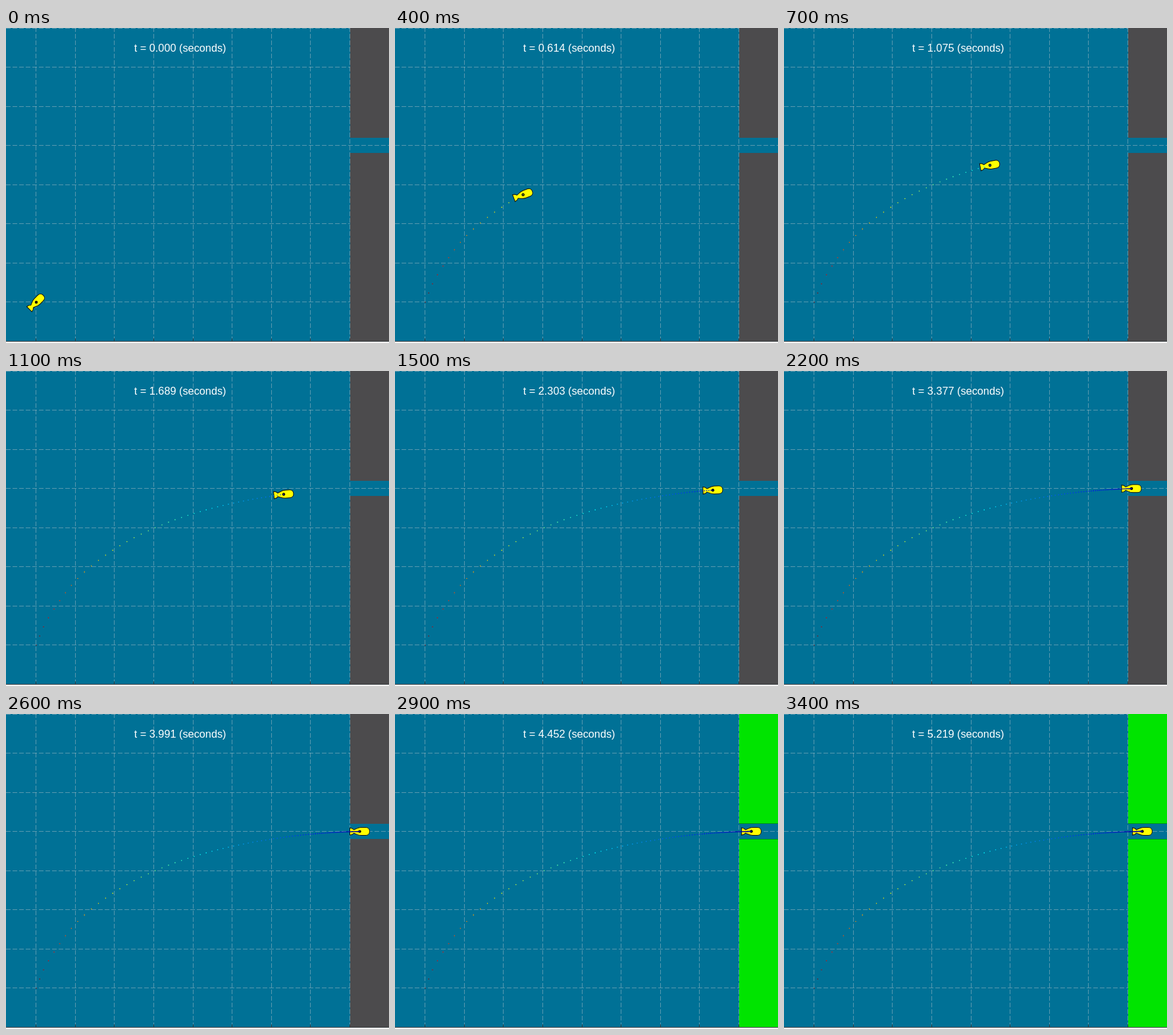
Write an HTML page with a canvas that moves like this. It is 582 px wide and 479 px high and loops after 3.5 s.

```html
<!DOCTYPE html>
<html lang="en">
<head>
<meta charset="utf-8">
<title>Fish trajectory</title>
<style>
  html, body { margin: 0; width: 582px; height: 479px; overflow: hidden; background: #f0f0f0; }
  canvas { display: block; }
</style>
</head>
<body>
<canvas id="stage" width="582" height="479"></canvas>
<script>
const ctx = document.getElementById('stage').getContext('2d');
const LOOP = 3500, FRAME = 100, SUBSTEPS = 4;
const GRID = 59.56, LEFT = 46, BOTTOM = 476, WALL = 523;
const GATE = { top: 167, bottom: 190 };
const OPEN_FRAME = 27;

// Horizontal position at selected substeps, joined by a smooth curve.
const KNOTS = [[0, 46], [2, 57], [4, 73], [8, 109], [14, 173], [20, 237], [28, 313],
  [36, 375], [44, 422], [60, 483], [76, 515], [90, 529.7], [104, 537.5], [116, 541.5], [136, 544.5]];

function slope(k) {
  const a = KNOTS[Math.max(k - 1, 0)], b = KNOTS[Math.min(k + 1, KNOTS.length - 1)];
  return (b[1] - a[1]) / (b[0] - a[0]);
}

function xAt(i) {
  let k = 0;
  while (k < KNOTS.length - 2 && i > KNOTS[k + 1][0]) k++;
  const [i0, x0] = KNOTS[k], [i1, x1] = KNOTS[k + 1];
  const h = i1 - i0, u = (i - i0) / h, w = 1 - u;
  return (1 + 2 * u) * w * w * x0 + u * w * w * h * slope(k)
    + u * u * (3 - 2 * u) * x1 - u * u * w * h * slope(k + 1);
}

function yAt(i) {
  return 178.5 + 238.5 * Math.exp(-0.0757 * i + 0.055 * (1 - Math.exp(-i / 3)));
}

const headingAt = i => -Math.PI / 4 * Math.exp(-0.05 * i);

function jet(v) {
  const channel = c => Math.round(255 * Math.min(1, Math.max(0, 1.5 - Math.abs(4 * v - c))));
  return `rgb(${channel(3)},${channel(2)},${channel(1)})`;
}

const trail = Array.from({ length: 137 }, (_, i) => ({
  x: xAt(i), y: yAt(i), color: jet(Math.exp(-0.037 * i))
}));

const fish = new Path2D(`M-15 -5.5 L-11.5 -4.7 L-9 -2.6 C-5.5 -3.6 -3 -6 2 -6 L9 -6
  C13 -6 15 -3 15 0 C15 3 13 6 9 6 L2 6 C-3 6 -5.5 3.6 -9 2.6 L-11.5 4.7 L-15 5.5 Z`);

function line(x0, y0, x1, y1) {
  ctx.beginPath();
  ctx.moveTo(x0, y0);
  ctx.lineTo(x1, y1);
  ctx.stroke();
}

function dot(x, y, r, color) {
  ctx.fillStyle = color;
  ctx.beginPath();
  ctx.arc(x, y, r, 0, 2 * Math.PI);
  ctx.fill();
}

const snap = v => Math.floor(v) + 0.5;
const columnAt = k => snap(LEFT + k * GRID - 0.2);

function drawTank(open) {
  ctx.fillStyle = '#f0f0f0';
  ctx.fillRect(0, 0, 582, 479);
  ctx.fillStyle = '#007196';
  ctx.fillRect(0, 0, 582, BOTTOM);

  ctx.lineWidth = 1;
  ctx.strokeStyle = 'rgba(220,212,212,.4)';
  ctx.setLineDash([7, 3]);
  for (let k = 0; k < 8; k++) {
    const y = snap(k * GRID);
    line(0, y, 582, y);
  }
  for (let k = 0; k < 9; k++) line(columnAt(k), BOTTOM, columnAt(k), 0);
  ctx.setLineDash([]);

  ctx.fillStyle = open ? '#00e400' : '#4c4b4d';
  ctx.fillRect(WALL, 0, 582 - WALL, GATE.top);
  ctx.fillRect(WALL, GATE.bottom, 582 - WALL, BOTTOM - GATE.bottom);
  if (open) {
    ctx.strokeStyle = 'rgba(0,40,40,.4)';
    line(WALL, GATE.top - 0.5, 582, GATE.top - 0.5);
    line(WALL, GATE.bottom + 0.5, 582, GATE.bottom + 0.5);
  }

  ctx.strokeStyle = '#3a3f42';
  line(0, BOTTOM + 0.5, 582, BOTTOM + 0.5);
  for (let k = 0; k < 9; k++) line(columnAt(k), BOTTOM - 4, columnAt(k), BOTTOM);
}

function drawFish(i) {
  const { x, y } = trail[i];
  ctx.save();
  ctx.translate(x, y);
  ctx.rotate(headingAt(i));
  ctx.fillStyle = '#ff0';
  ctx.strokeStyle = '#111';
  ctx.lineWidth = 1;
  ctx.fill(fish);
  ctx.stroke(fish);
  ctx.restore();
  dot(x, y, 2.2, '#000');
}

function draw(n) {
  const last = n * SUBSTEPS;
  drawTank(n >= OPEN_FRAME);
  drawFish(last);
  for (const p of trail.slice(0, last + 1)) dot(p.x, p.y, 0.78, p.color);

  const seconds = (Math.round(n * 1535 / 10) / 1000).toFixed(3);
  ctx.font = '16.3px "Liberation Sans", Arial, sans-serif';
  ctx.textAlign = 'center';
  ctx.fillStyle = '#fff';
  ctx.fillText(`t = ${seconds} (seconds)`, 264.6, 36);
}

const start = performance.now();
function tick() {
  draw(Math.floor((performance.now() - start) % LOOP / FRAME));
  requestAnimationFrame(tick);
}
tick();
</script>
</body>
</html>
```
